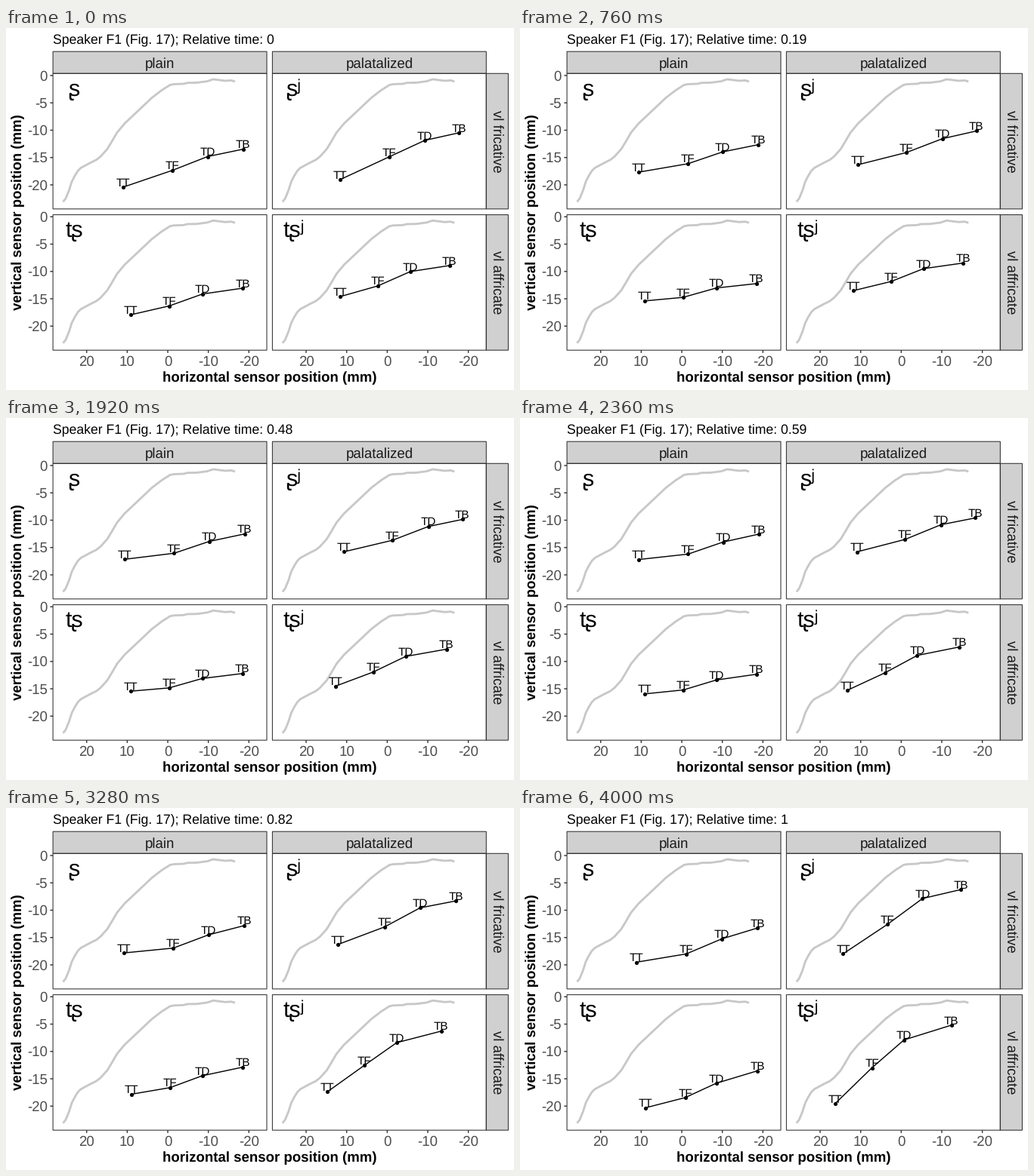
These frames come from a looping animation (672x480 px, 4040 ms). A matplotlib script:

```python
import numpy as np
import matplotlib.pyplot as plt
from matplotlib.animation import FuncAnimation
from matplotlib.patches import Rectangle

W, H, DPI = 672, 480, 96
FRAMES, INTERVAL = 101, 40
PT = 72 / DPI  # points per pixel

plt.rcParams["font.family"] = ["Liberation Sans", "DejaVu Sans"]
plt.rcParams["text.hinting"] = "none"

INK, TICK_TEXT, STRIP_TEXT = "#333333", "#4d4d4d", "#1a1a1a"
STRIP_FILL, PALATE_GREY = "#d0d0d0", "#c8c8c8"

LEFT, TOP = 62.1, 60.3            # first panel corner
PANEL_W, PANEL_H = 282.9, 179.6
DX, DY = 290.3, 187.3             # panel pitch
STRIP = 29.1
X0, X_UNIT = 214, 5.365           # pixel of 0 mm, pixels per mm
Y0, Y_UNIT = 63, 7.25

SENSORS = ["TT", "TF", "TD", "TB"]
SETTLE = 9  # decay rate from the start pose into the rest pose

# Poses in pixels, tip to back. The tongue settles into a rest pose
# (x0 + nudge, rest), then leaves it for the end pose as t ** rise.
TONGUES = {
    "ʂ": dict(x0=[155, 220.3, 266.5, 313.6], nudge=2.2,
              x1=[153.8, 219.8, 267, 314.5],
              y0=[211, 188.7, 170.5, 160.7],
              rest=[186.8, 178, 162.8, 153.3],
              y1=[204.5, 193.5, 173.5, 159],
              rise=[6, 3.5, 3.5, 4]),
    "ʂʲ": dict(x0=[442, 506.5, 554, 599], nudge=6,
               x1=[427.5, 486, 532.5, 583],
               y0=[201, 171, 149, 139],
               rest=[177, 164, 146.4, 136],
               y1=[193.3, 154.3, 120, 108.2],
               rise=[7, 2.2, 3.2, 3.9]),
    "tʂ": dict(x0=[165.3, 216, 260, 313], nudge=-0.4,
               x1=[166, 218.5, 259.5, 314],
               y0=[380.2, 368.5, 352.7, 345],
               rest=[357.5, 354.4, 342.8, 337.5],
               y1=[397.5, 384, 365, 348.5], rise=3),
    "tʂʲ": dict(x0=[441.5, 491.8, 534.8, 586.5], nudge=0,
                x1=[416.8, 465.5, 508, 570.5],
                y0=[356.3, 342, 323, 315],
                rest=[344.5, 334.4, 318.7, 312],
                y1=[392, 344.5, 307.5, 288], rise=2),
}

PALATE = np.array([
    (75.5, 230.5), (79, 226), (83.5, 215), (87, 203.8), (91, 196),
    (95, 189.5), (99, 185.5), (112, 178.5), (119.5, 174.8), (125, 170.5),
    (134, 160.5), (140, 150.5), (147, 138.5), (157, 126.5), (174, 110.5),
    (193, 92.5), (206, 82.5), (217, 75.5), (222, 74.5), (235, 74),
    (240, 72.7), (252, 72.5), (266, 70.7), (274, 68), (290, 70),
    (298, 69.5), (303, 71),
])

fig = plt.figure(figsize=(W / DPI, H / DPI), dpi=DPI, facecolor="white")
ax = fig.add_axes([0, 0, 1, 1])
ax.set(xlim=(0, W), ylim=(H, 0))
ax.axis("off")


def label(x, y, text, size=14, ha="center", **kw):
    return ax.text(x, y, text, fontsize=size, ha=ha, va="baseline",
                   rotation_mode="anchor", **kw)


def box(x, y, w, h, fill="none", z=1):
    ax.add_patch(Rectangle((x, y), w, h, fc=fill, ec=INK, lw=1.07 * PT,
                           snap=False, zorder=z))


def tick(xs, ys):
    ax.plot(xs, ys, color=INK, lw=1.42 * PT, solid_capstyle="butt",
            snap=False)


# Strips and axes
right = LEFT + DX + PANEL_W
bottom = TOP + DY + PANEL_H
for i, (col, row) in enumerate([("plain", "vl fricative"),
                                ("palatalized", "vl affricate")]):
    x, y = LEFT + i * DX, TOP + i * DY
    box(x, TOP - STRIP, PANEL_W, STRIP, STRIP_FILL)
    label(x + PANEL_W / 2, 52.6, col, color=STRIP_TEXT)
    box(right, y, STRIP, PANEL_H, STRIP_FILL)
    label(644.4, y + PANEL_H / 2, row, color=STRIP_TEXT, rotation=-90)
    for mm in range(-20, 21, 10):
        px = X0 + i * DX - mm * X_UNIT
        tick([px, px], [bottom, bottom + 3.7])
        label(px, 448, str(mm), color=TICK_TEXT)
    for mm in range(-20, 1, 5):
        py = Y0 + i * DY - mm * Y_UNIT
        tick([LEFT - 3.7, LEFT], [py, py])
        label(54.8, py + 6.5, str(mm), ha="right", color=TICK_TEXT)

label((LEFT + right) / 2, 469.3, "horizontal sensor position (mm)",
      weight="bold")
label(20.6, (TOP + bottom) / 2, "vertical sensor position (mm)",
      weight="bold", rotation=90)
title = label(61.8, 20.2, "", size=13.2, ha="left")


def track(start, rest, end, rise):
    """Path of the four sensors: settle from start to rest, rise to end."""
    start, rest, end = map(np.array, (start, rest, end))
    return lambda t: (rest + (start - rest) * np.exp(-SETTLE * t)
                      + (end - rest) * t ** np.array(rise, float))


# Panels
panels = []
for i, (name, p) in enumerate(TONGUES.items()):
    ox, oy = (i % 2) * DX, (i // 2) * DY
    ax.plot(*(PALATE + (ox, oy)).T, color=PALATE_GREY, lw=2.85 * PT,
            solid_capstyle="butt", zorder=2)
    box(LEFT + ox, TOP + oy, PANEL_W, PANEL_H, z=5)
    label(90 + ox, 89.3 + oy, name, size=22.8)
    line, = ax.plot([], [], "o-", color="black", lw=1.42 * PT,
                    ms=5.2 * PT, mew=0, zorder=3)
    tags = [label(0, 0, s, size=11.4, zorder=4) for s in SENSORS]
    path_x = track(p["x0"], np.add(p["x0"], p["nudge"]), p["x1"],
                   np.mean(p["rise"]))
    path_y = track(p["y0"], p["rest"], p["y1"], p["rise"])
    panels.append((line, tags, path_x, path_y))


def draw(frame):
    t = frame / (FRAMES - 1)
    title.set_text(f"Speaker F1 (Fig. 17); Relative time: {t:g}")
    for line, tags, path_x, path_y in panels:
        xs, ys = path_x(t), path_y(t)
        line.set_data(xs, ys)
        for tag, x, y in zip(tags, xs, ys):
            tag.set_position((x, y - 1.5))
    return [title]


anim = FuncAnimation(fig, draw, frames=FRAMES, interval=INTERVAL,
                     repeat=True, repeat_delay=0, blit=False)
plt.show()
```
